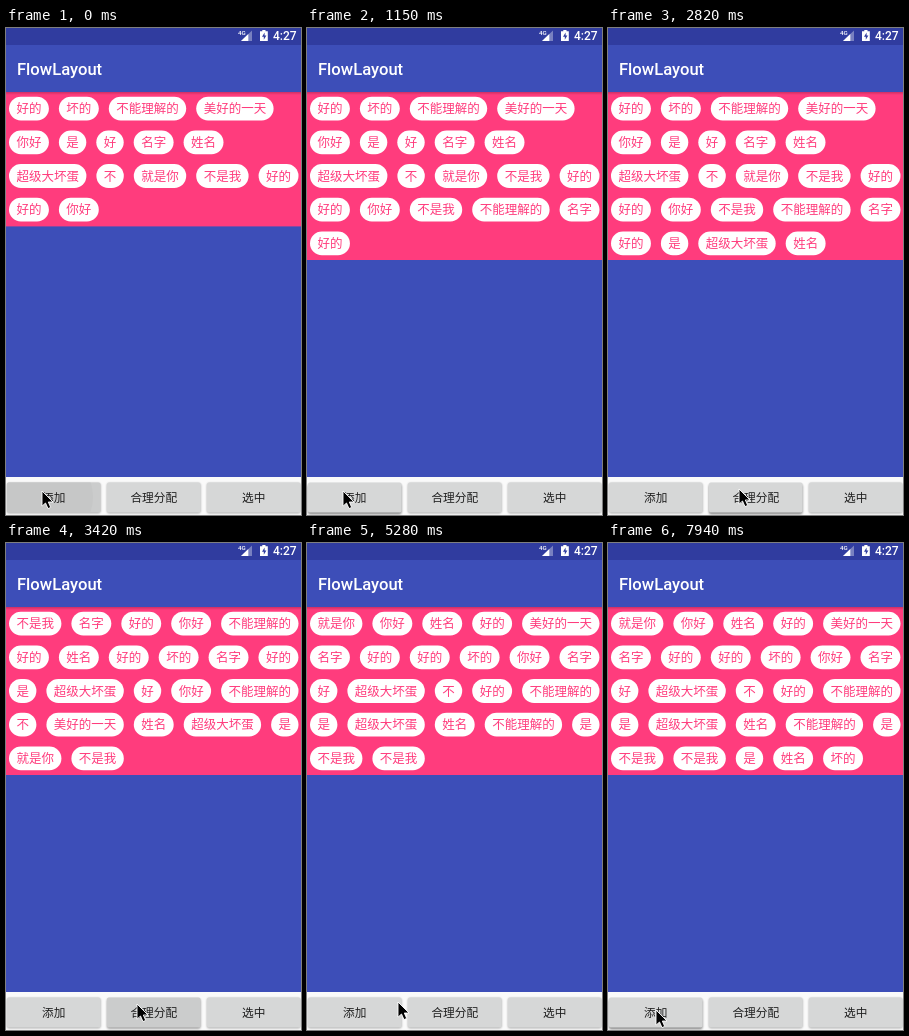
Write an HTML page that moves like this. It is 295 px wide and 487 px high and loops after 8 s.

```html
<!DOCTYPE html>
<html lang="zh-CN">
<head>
<meta charset="utf-8">
<title>FlowLayout</title>
<style>
  html, body { margin: 0; width: 100%; height: 100%; overflow: hidden; background: #3d4eb8; }
  svg { display: block; width: 295px; height: 487px; }
  text { font-family: "Noto Sans CJK SC", "Noto Sans CJK", "Noto Sans CJK JP", sans-serif; }
  .latin { font-family: Roboto, sans-serif; font-weight: 500; fill: #fff; }
  #chips text { font-size: 12.5px; fill: #ff3c7d; text-anchor: middle; }
  #buttons text { font-size: 11.7px; fill: #202020; text-anchor: middle; }
</style>
</head>
<body>
<svg viewBox="0 0 295 487" xmlns="http://www.w3.org/2000/svg">
  <defs>
    <filter id="soft" x="-10%" y="-30%" width="120%" height="160%"><feGaussianBlur stdDeviation="0.9"/></filter>
    <linearGradient id="barShadow" x1="0" y1="0" x2="0" y2="1">
      <stop offset="0" stop-color="#000" stop-opacity=".2"/>
      <stop offset="1" stop-color="#000" stop-opacity="0"/>
    </linearGradient>
    <clipPath id="face"><rect x="1" y="454.5" width="93.5" height="30" rx="1.7"/></clipPath>
  </defs>
  <rect width="295" height="487" fill="#3d4eb8"/>
  <rect id="panel" y="64" width="295" fill="#ff3c7d"/>
  <rect y="64" width="295" height="3" fill="url(#barShadow)"/>
  <rect width="295" height="17" fill="#303c9f"/>

  <text class="latin" x="232" y="7" font-size="6.2">4G</text>
  <path d="M235 13L246 2.5V13Z" fill="#fff" opacity=".35"/>
  <path d="M235 13L242.3 6V13Z" fill="#fff"/>
  <path d="M254 3.2h2.3V2h3.2v1.2h2.3V13H254Z" fill="#fff"/>
  <path d="M258.6 4.6l-2.6 4.2h1.8v3l2.6-4.3h-1.8Z" fill="#303c9f"/>
  <text class="latin" x="267" y="12.3" font-size="12">4:27</text>
  <text class="latin" x="11" y="47" font-size="16.6">FlowLayout</text>

  <g id="chips"></g>
  <rect y="449" width="295" height="38" fill="#fafafa"/>
  <g id="buttons"></g>
  <path id="cursor" d="M0 0V15.2L3.5 12 6 17.6 8.7 16.4 6.3 11H11Z"
        fill="#000" stroke="#fff" stroke-width=".9"/>
</svg>
<script>
const LOOP = 8000;
const byId = id => document.getElementById(id);
const words = text => text.split(' ');

const initial = words('好的 坏的 不能理解的 美好的一天 你好 是 好 名字 姓名 超级大坏蛋 不 就是你 不是我 好的 好的 你好');
const mixed = words('不是我 名字 好的 你好 不能理解的 好的 姓名 好的 坏的 名字 好的 是 超级大坏蛋 好 你好 不能理解的 不 美好的一天 姓名 超级大坏蛋 是 就是你 不是我');
const sorted = words('就是你 你好 姓名 好的 美好的一天 名字 好的 好的 坏的 你好 名字 好 超级大坏蛋 不 好的 不能理解的 是 超级大坏蛋 姓名 不能理解的 是 不是我 不是我');

// Each event either appends one word or replaces the whole list.
const listEvents = [
  [0, initial], [260, '不是我'], [500, '不能理解的'], [680, '名字'], [1150, '好的'],
  [1980, '是'], [2160, '超级大坏蛋'], [2250, '姓名'],
  [3240, mixed], [4040, sorted],
  [6350, '是'], [6790, '姓名'], [7460, '坏的']
];

// Button states as [time, elevation, pressed]
const buttons = [
  { label: '添加', states: [[0, 0, 1], [890, 1, 1], [1150, 1, 0], [1210, .5, 0], [1300, 0, 0],
      [2070, 1, 0], [2340, .5, 0], [2430, 0, 0], [5900, 1, 0], [6940, .5, 0], [7030, 0, 0], [7940, 1, 0]] },
  { label: '合理分配', states: [[0, 0, 0], [2820, 1, 0], [3240, .5, 1], [4490, 0, 0]] },
  { label: '选中', states: [[0, 0, 0]] }
];

// Pointer tip as [time, x, y]
const pointer = [
  [0, 36, 463], [2340, 36, 463], [2540, 131, 461], [4490, 131, 461], [4830, 235, 463],
  [5200, 84, 461], [5280, 91, 459], [5340, 91, 459], [5440, 74, 453], [5580, 48, 467], [LOOP, 48, 467]
];
const POINTER_STEP = 66;

const lastAt = (list, t) => list.filter(item => item[0] <= t).pop();

function wordsAt(t) {
  return listEvents.filter(([time]) => time <= t)
    .reduce((list, [, change]) => Array.isArray(change) ? change : [...list, change], []);
}

function drawChips(list) {
  let x = 3, row = 0, markup = '';
  for (const word of list) {
    const width = 14.9 + 12.5 * word.length;
    if (x + width > 293.5) { x = 3; row++; }
    const middle = 80.6 + 33.7 * row;
    markup += `<rect x="${x}" y="${middle - 11.9}" width="${width}" height="23.8" rx="11.9" fill="#fff"/>
      <text x="${x + width / 2}" y="${middle + 4.7}">${word}</text>`;
    x += width + 10;
  }
  byId('chips').innerHTML = markup;
  byId('panel').setAttribute('height', 33.6 * (row + 1));
}

function drawButtons(t) {
  byId('buttons').innerHTML = buttons.map(({ label, states }, i) => {
    const [, lift, pressed] = lastAt(states, t);
    const ripple = pressed && i === 0
      ? '<circle cx="40" cy="469" r="47" fill="#c6c7c7" clip-path="url(#face)"/>' : '';
    return `<g transform="translate(${i * 100})">
      <rect x="1" y="${455.2 + lift}" width="93.5" height="30" rx="2" fill="#000"
        opacity="${.33 + .14 * lift}" filter="url(#soft)"/>
      <rect x="1" y="454.5" width="93.5" height="30" rx="1.7" fill="${pressed ? '#cbcccc' : '#d6d7d7'}"/>
      ${ripple}<text x="47.8" y="473.6">${label}</text></g>`;
  }).join('');
}

function movePointer(t) {
  const next = Math.max(1, pointer.findIndex(key => key[0] > t));
  const [t0, x0, y0] = pointer[next - 1], [t1, x1, y1] = pointer[next];
  const k = Math.floor((t - t0) / POINTER_STEP) * POINTER_STEP / (t1 - t0);
  const x = x0 + (x1 - x0) * k, y = y0 + (y1 - y0) * k;
  byId('cursor').setAttribute('transform', `translate(${x.toFixed(1)} ${y.toFixed(1)})`);
}

let shownList = '', shownState = '';
function render(t) {
  const list = wordsAt(t), listKey = list.join();
  if (listKey !== shownList) drawChips(list);
  shownList = listKey;
  const stateKey = buttons.map(b => lastAt(b.states, t)).join();
  if (stateKey !== shownState) drawButtons(t);
  shownState = stateKey;
  movePointer(t);
}

const start = performance.now();
function tick() {
  render((performance.now() - start) % LOOP);
  requestAnimationFrame(tick);
}
tick();
</script>
</body>
</html>
```
